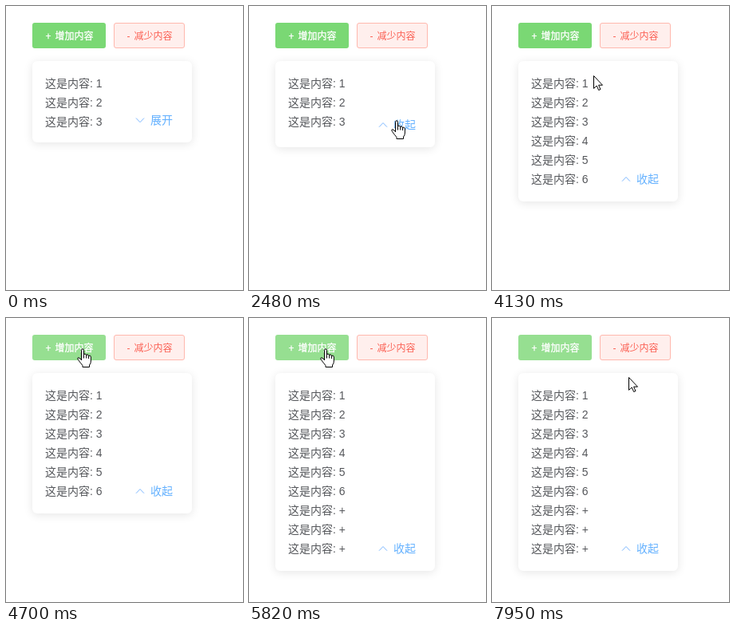
An HTML page that plays this animation: 297 px wide and 356 px high, repeating every 8000 ms.

```html
<!DOCTYPE html>
<html lang="zh-CN">
<head>
<meta charset="utf-8">
<style>
  html, body { margin: 0; width: 100%; height: 100%; overflow: hidden; background: #fff; }
  #card { position: absolute; left: 33px; top: 69px; width: 200px; border-radius: 6px;
          background: #fff; box-shadow: 0 2px 12px rgba(0, 0, 0, .1); }
  svg { position: absolute; left: 0; top: 0; }
  text { font: 14px "Liberation Sans", "Noto Sans CJK SC", "Noto Sans CJK", sans-serif; fill: #56585c; }
  .button text { font-size: 12px; font-weight: 500; }
  #add text { fill: #fff; stroke: #fff; stroke-width: .3; }
  #remove text { fill: #fb6154; }
  #link text { fill: #62b0ff; }
  #link path { fill: none; stroke: #7ab6ff; }
  .cursor { fill: #fff; stroke: #000; stroke-linejoin: round; }
</style>
</head>
<body>
<div id="card"></div>
<svg width="297" height="356" viewBox="0 0 297 356">
  <clipPath id="clip"><rect id="window" x="33" y="85" width="200"/></clipPath>
  <g class="button" id="add">
    <rect id="addFace" x="33" y="21" width="92" height="32" rx="3"/>
    <text x="49.5" y="42">+</text><text x="61.5" y="42">增加内容</text>
  </g>
  <g class="button" id="remove">
    <rect x="135.5" y="21.5" width="88" height="31" rx="2.5" fill="#ffefed" stroke="#ffb8ae"/>
    <text x="151.5" y="42">-</text><text x="160.5" y="42">减少内容</text>
  </g>
  <g id="items" clip-path="url(#clip)"></g>
  <g id="link"><path id="chevron"/><text id="label" x="181" y="5"></text></g>
  <path id="arrow" class="cursor" d="M.5.5V16.4L4.2 13 6.7 18.5 9 17.5 6.6 12.2H11.5Z"/>
  <path id="hand" class="cursor" d="M-.5 15V2.4Q-.5.8 1 .8T2.5 2.4V8.5Q2.6 7 4 7T5.6 9Q5.8 7.8 7 7.8T8.6 10Q9 9 10 9T11.4 11V16Q11.4 19 9.5 21V23.5H1V21.5Q-1.5 18.5-4.5 14.5-5.7 12.5-4.8 11.8-3.4 11-.5 14.5ZM2.5 8.5V12.5M5.6 9V12.5M8.6 10V13"/>
</svg>
<script>
const LOOP = 8000, ROW = 24, TOP = 85;
const OPEN = 2360, PRESS = 5380, RELEASE = 5460;
const $ = id => document.getElementById(id);
const clamp = v => Math.min(1, Math.max(0, v));
const smooth = p => p * p * (3 - 2 * p);
const mix = (a, b, p) => a + (b - a) * p;

// Pointer hot spot: time, x, y
const path = [
  [1480, 290, 147], [1640, 236, 150], [1860, 184, 143], [3640, 184, 143],
  [4130, 127, 87], [4450, 99, 47], [4700, 95, 38], [7590, 95, 38], [7950, 171, 74]
];

const rows = Array.from({ length: 9 }, (_, i) => {
  const row = document.createElementNS('http://www.w3.org/2000/svg', 'text');
  row.setAttribute('x', 49);
  row.setAttribute('y', TOP + 17 + i * ROW);
  row.textContent = '这是内容: ' + (i < 6 ? i + 1 : '+');
  return $('items').appendChild(row);
});

function pointerAt(t) {
  const next = path.findIndex(p => p[0] > t);
  if (next < 0) return path[path.length - 1].slice(1);
  const a = path[next - 1], b = path[next], p = (t - a[0]) / (b[0] - a[0]);
  return [mix(a[1], b[1], p), mix(a[2], b[2], p)];
}

function contentHeight(t) {
  if (t < OPEN) return 70;
  if (t < RELEASE) return mix(65, 6 * ROW, smooth(clamp((t - 2400) / 350)));
  return mix(6 * ROW, 9 * ROW, smooth(clamp((t - RELEASE) / 350)));
}

function drawPointer(t) {
  const shown = t >= path[0][0];
  const [x, y] = shown ? pointerAt(t) : [0, 0];
  const onLink = t < 2740 && x < 212;
  const onButton = y < 53 && x < 125;
  const isHand = onLink || onButton;
  for (const [id, on] of [['arrow', !isHand], ['hand', isHand]]) {
    $(id).style.display = shown && on ? '' : 'none';
    $(id).setAttribute('transform', `translate(${Math.round(x)} ${Math.round(y)})`);
  }
}

function drawButton(t) {
  const p = clamp((t - 4400) / 100);
  const pressed = t >= PRESS && t < RELEASE;
  $('addFace').setAttribute('fill', pressed ? '#6ec268'
    : `rgb(${mix(122, 150, p)}, ${mix(216, 223, p)}, ${mix(116, 145, p)})`);
}

function drawCard(t) {
  const height = contentHeight(t), open = t >= OPEN;
  $('card').style.height = height + 32 + 'px';
  $('window').setAttribute('height', height);
  rows.forEach((row, i) => row.style.display = i < 6 || t >= RELEASE ? '' : 'none');
  $('link').setAttribute('transform', `translate(0 ${Math.round(TOP + height - 12)})`);
  $('label').textContent = open ? '收起' : '展开';
  $('chevron').setAttribute('d', open ? 'M163 2.7L168-2.5 173 2.7' : 'M163-2.5L168 2.7 173-2.5');
}

function frame(now) {
  const t = now % LOOP;
  drawCard(t);
  drawButton(t);
  drawPointer(t);
  requestAnimationFrame(frame);
}
frame(0);
</script>
</body>
</html>
```
